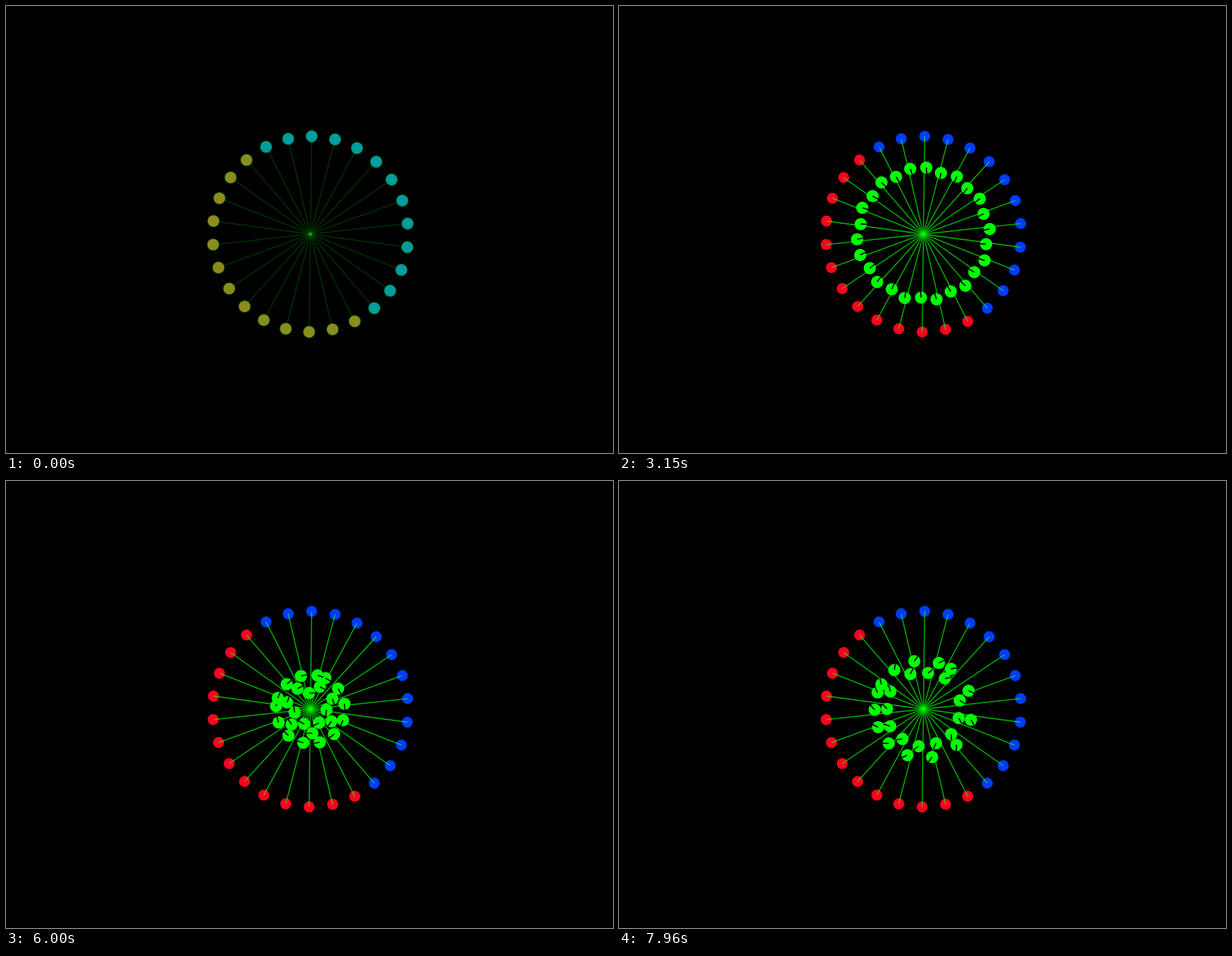
These frames come from a looping animation (872 by 642 pixels, 7.99 s). An HTML page with a canvas:

```html
<!DOCTYPE html>
<html lang="en">
<head>
<meta charset="utf-8">
<title>Circle crossing</title>
<style>
  html, body { margin: 0; width: 100%; height: 100%; overflow: hidden; background: #000; }
  canvas { display: block; }
</style>
</head>
<body>
<canvas id="stage" width="872" height="642"></canvas>
<script>
const ctx = document.getElementById('stage').getContext('2d');
const LOOP = 7990, FADE = 1140, START = 1325;
const CX = 437.3, CY = 327.6, RING = 140.5, COUNT = 26;
const RAD = Math.PI / 180, SEAM = 19;

// Key points of the motion: angles in degrees, radii in pixels.
const times = [START, 2260, 3545, 4040, 4810, 6000, 6670, 7960];
const outerLane = {
  turn:   [0, 0, 3, 6.7, 17, 25, 32, 45],
  radius: [RING, 115.2, 87.3, 77.2, 63.5, 49.5, 46.5, 70]
};
const innerLane = {
  turn:   [0, 0, 2.5, 5.8, 14, 50, 62, 62],
  radius: [RING, 115.2, 80.6, 67, 48, 29, 25.5, 53]
};
const swerve = [0, 0, 12, 25, 46, 85, 100, 134];

const clamp = v => Math.min(1, Math.max(0, v));
const polar = (deg, r) => [CX + r * Math.cos(deg * RAD), CY + r * Math.sin(deg * RAD)];

// Lanes alternate around the ring; two outer agents meet at the seam.
const agents = Array.from({ length: COUNT }, (_, k) => {
  const angle = -89.25 + k * 360 / COUNT;
  const rank = k + (k >= SEAM ? 1 : 0);
  return {
    angle,
    home: polar(angle, RING),
    blue: k <= 10 || k >= 24,
    outer: rank % 2 === 0,
    side: rank % 4 === 1 ? 1 : -1
  };
});

// Cubic Hermite curve through the unevenly spaced key times.
function curve(vs, t) {
  const last = times.length - 1;
  if (t <= times[0]) return vs[0];
  if (t >= times[last]) return vs[last];
  let i = 0;
  while (t > times[i + 1]) i++;
  const slope = j => {
    const a = Math.max(0, j - 1), b = Math.min(last, j + 1);
    return (vs[b] - vs[a]) / (times[b] - times[a]);
  };
  const h = times[i + 1] - times[i], u = (t - times[i]) / h, u2 = u * u, u3 = u2 * u;
  return (2 * u3 - 3 * u2 + 1) * vs[i] + (u3 - 2 * u2 + u) * h * slope(i) +
         (3 * u2 - 2 * u3) * vs[i + 1] + (u3 - u2) * h * slope(i + 1);
}

// Inner agents split into two rings while the middle is crowded;
// outer agents drift apart unevenly as they leave it.
function place(a, t) {
  const lane = a.outer ? outerLane : innerLane;
  let turn = curve(lane.turn, t), r = curve(lane.radius, t);
  if (a.outer) turn += 15 * clamp((t - 6000) / 1500) * Math.cos((a.angle - 50) * RAD);
  else r += 6 * a.side * Math.exp(-(((t - 6200) / 1200) ** 2));
  return polar(a.angle + turn, r);
}

function disc(x, y, r, color) {
  ctx.fillStyle = color;
  ctx.beginPath();
  ctx.arc(x, y, r, 0, 2 * Math.PI);
  ctx.fill();
}

function line(x1, y1, x2, y2, color, width) {
  ctx.strokeStyle = color;
  ctx.lineWidth = width;
  ctx.beginPath();
  ctx.moveTo(x1, y1);
  ctx.lineTo(x2, y2);
  ctx.stroke();
}

function draw(t) {
  const shown = clamp((t - FADE) / (START - FADE));
  const veer = curve(swerve, t) * RAD;
  ctx.globalAlpha = 1;
  ctx.fillStyle = '#000';
  ctx.fillRect(0, 0, 872, 642);

  for (const a of agents) disc(...a.home, 7.9, a.blue ? '#003cff' : '#ff0020');

  ctx.globalAlpha = 0.18 + 0.48 * shown;
  for (const a of agents) line(CX, CY, ...a.home, '#0f0', 1.6);

  for (const a of agents) {
    const [x, y] = place(a, t);
    ctx.globalAlpha = 0.45 + 0.55 * shown;
    disc(x, y, 8.8, '#0f0');
    if (shown < 1) {
      ctx.globalAlpha = 1 - shown;
      disc(...a.home, 7.9, a.blue ? '#009ca0' : '#8c8c1e');
    }
    ctx.globalAlpha = shown;
    const dir = Math.atan2(CY - y, CX - x) - veer;
    line(x, y, x + 8.8 * Math.cos(dir), y + 8.8 * Math.sin(dir), '#000', 1.7);
  }
}

const begin = performance.now();
function tick() {
  draw((performance.now() - begin) % LOOP);
  requestAnimationFrame(tick);
}
tick();
</script>
</body>
</html>
```
